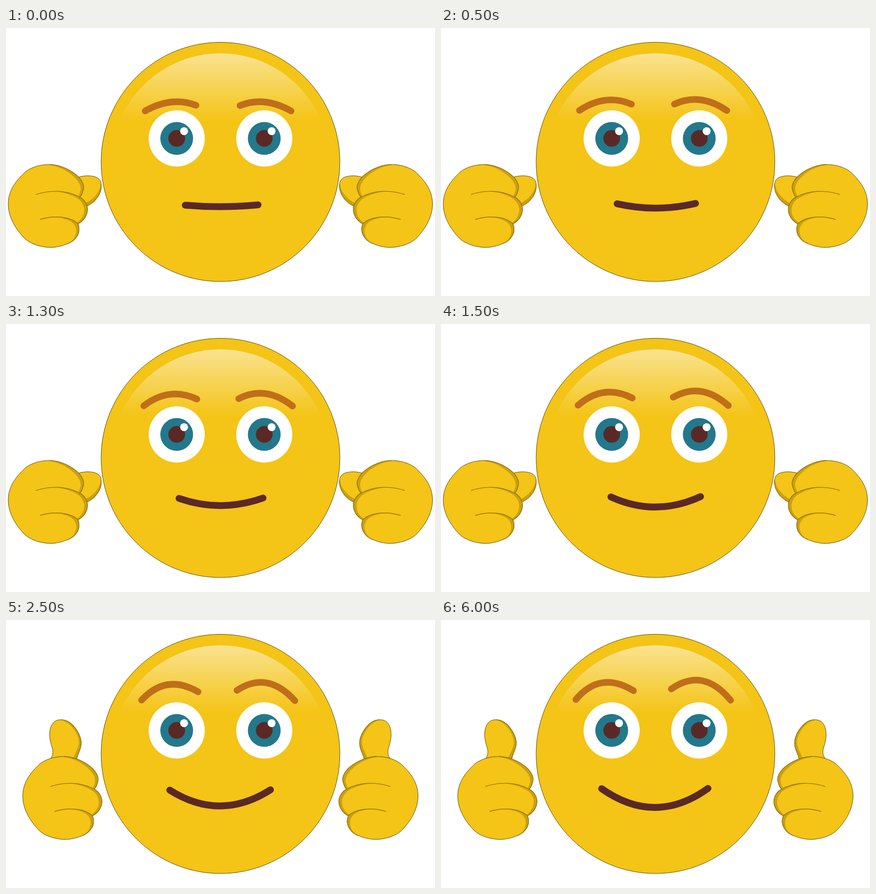
An HTML page for the animation above (8000 ms loop, 948 by 591 pixels).

```html
<!DOCTYPE html>
<html lang="en">
<head>
<meta charset="utf-8">
<title>Thumbs up</title>
<style>
  html, body { margin: 0; width: 100%; height: 100%; overflow: hidden; background: #fff; }
  svg { display: block; width: 100vw; height: 100vh; }
  .skin { fill: #f4c416; stroke: #4d3f0a; }
  .shade { fill: #cba010; }
  .edge { fill: none; stroke: #8d700d; stroke-width: 1.4; stroke-linecap: round; }
  .brow, .mouth { fill: none; stroke: #c06e1a; stroke-width: 14.5; stroke-linecap: round; }
  .mouth { stroke: #5a2925; stroke-width: 15; }
</style>
</head>
<body>
<svg viewBox="0 0 948 591">
  <defs>
    <linearGradient id="gloss" gradientUnits="userSpaceOnUse" x1="0" y1="55" x2="0" y2="203">
      <stop offset="0" stop-color="#fff" stop-opacity=".53"/>
      <stop offset="1" stop-color="#fff" stop-opacity="0"/>
    </linearGradient>
    <g id="eye">
      <circle r="62" fill="#fff"/>
      <circle r="36.2" fill="#23788c"/>
      <circle r="18.5" fill="#5a2925"/>
      <circle cx="16.3" cy="-16" r="8.7" fill="#fff"/>
    </g>
    <g id="fist">
      <path class="skin" d="M5 388C5 355 26 333 43 317C58 306 76 301 97 301C122 302 145 314 160 328C170 339 174 350 170 359Q168 368 163 373C173 378 180 389 180 400C180 413 172 425 159 432C163 440 162 452 157 459C152 468 145 472 138 475C126 480 112 484 97 484C74 483 52 475 40 463C22 444 5 418 5 388Z"/>
      <path class="shade" d="M90 301.5C122 301 145 314 160 328C170 339 174 350 170 359Q168 368 163 373L160 370Q164 364 165 357C166 346 159 336 150 328C133 312 114 304 90 301.5Z"/>
      <path class="shade" d="M112 360.5C134 361 150 366 163 373C173 378 180 389 180 400C180 413 172 425 159 432L156 430C168 422 173 412 173 400C172 388 165 380 157 375C145 368 130 363 112 360.5Z"/>
      <path class="shade" d="M112 417C131 417 148 422 159 432C163 440 162 452 157 459C152 468 145 472 138 475C148 469 154 461 155 450C156 442 153 436 148 430C139 422 126 419 112 417Z"/>
      <path class="edge" d="M97 301C122 302 145 314 160 328C170 339 174 350 170 359Q168 368 163 373M67 367C96 357 134 357 163 373C173 378 180 389 180 400C180 413 172 425 159 432M76 422C105 413 142 415 159 432C163 440 162 452 157 459C152 468 145 472 138 475"/>
    </g>
    <g id="closed">
      <path class="skin" d="M160 329C172 325 192 324 203 331C213 338 212 352 207 364C200 378 190 386 178 393L160 375Z"/>
      <path class="shade" d="M210 343C213 362 200 384 178 393L176 386C191 379 206 366 210 343Z"/>
      <path class="edge" d="M210 343C213 362 200 384 178 393"/>
      <use href="#fist"/>
    </g>
    <g id="open">
      <path class="skin" d="M99 305C104 298 104 292 103 285C99 272 95 260 97 245C99 229 108 219 122 220C137 220 148 230 157 244C167 260 168 272 164 284C161 293 158 298 156 307L130 320Z"/>
      <path class="shade" d="M118 220C137 219 148 230 157 244C167 260 168 272 164 284C161 293 158 298 156 307L149 304C152 294 160 284 161 271C161 258 154 245 146 236C138 227 130 222 118 220Z"/>
      <path class="edge" d="M122 220C137 220 148 230 157 244C167 260 168 272 164 284C161 293 158 298 156 307"/>
      <use href="#fist" x="32"/>
    </g>
  </defs>
  <circle class="skin" cx="474" cy="295.3" r="263.8"/>
  <path d="M252 203A241 241 0 0 1 696 203Z" fill="url(#gloss)"/>
  <use href="#eye" x="377.2" y="243.5"/>
  <use href="#eye" x="570.7" y="243.5"/>
  <path class="brow"/>
  <path class="brow"/>
  <path class="mouth"/>
  <use class="hand"/>
  <use class="hand" transform="matrix(-1 0 0 1 947.5 0)"/>
</svg>
<script>
  const LOOP = 8000, STEP = 500, LAST = 6;
  const all = selector => [...document.querySelectorAll(selector)];
  const hands = all('.hand');

  // Start point, control point and end point of each feature: neutral, then smiling
  const poses = [
    [[307.5, 183, 366, 150, 420, 170.5], [298, 175.5, 351.5, 111, 425.5, 156]],
    [[517, 171, 571, 149.5, 630, 183], [509, 152, 579, 103, 640, 177]],
    [[396, 390.7, 475, 397.5, 557, 390], [355, 372, 473, 455, 590, 371.3]]
  ];
  const features = all('.brow, .mouth');

  function draw(step) {
    const p = step / LAST;
    features.forEach((path, i) => {
      const [from, to] = poses[i];
      const [x, y, ...rest] = from.map((v, k) => v + (to[k] - v) * p);
      path.setAttribute('d', `M${x} ${y}Q${rest}`);
    });
    hands.forEach(hand => hand.setAttribute('href', step < 5 ? '#closed' : '#open'));
  }

  let shown = -1;
  const start = performance.now();
  function tick() {
    const time = (performance.now() - start) % LOOP;
    const step = Math.min(LAST, Math.floor(time / STEP));
    if (step !== shown) draw(shown = step);
    requestAnimationFrame(tick);
  }
  tick();
</script>
</body>
</html>
```
